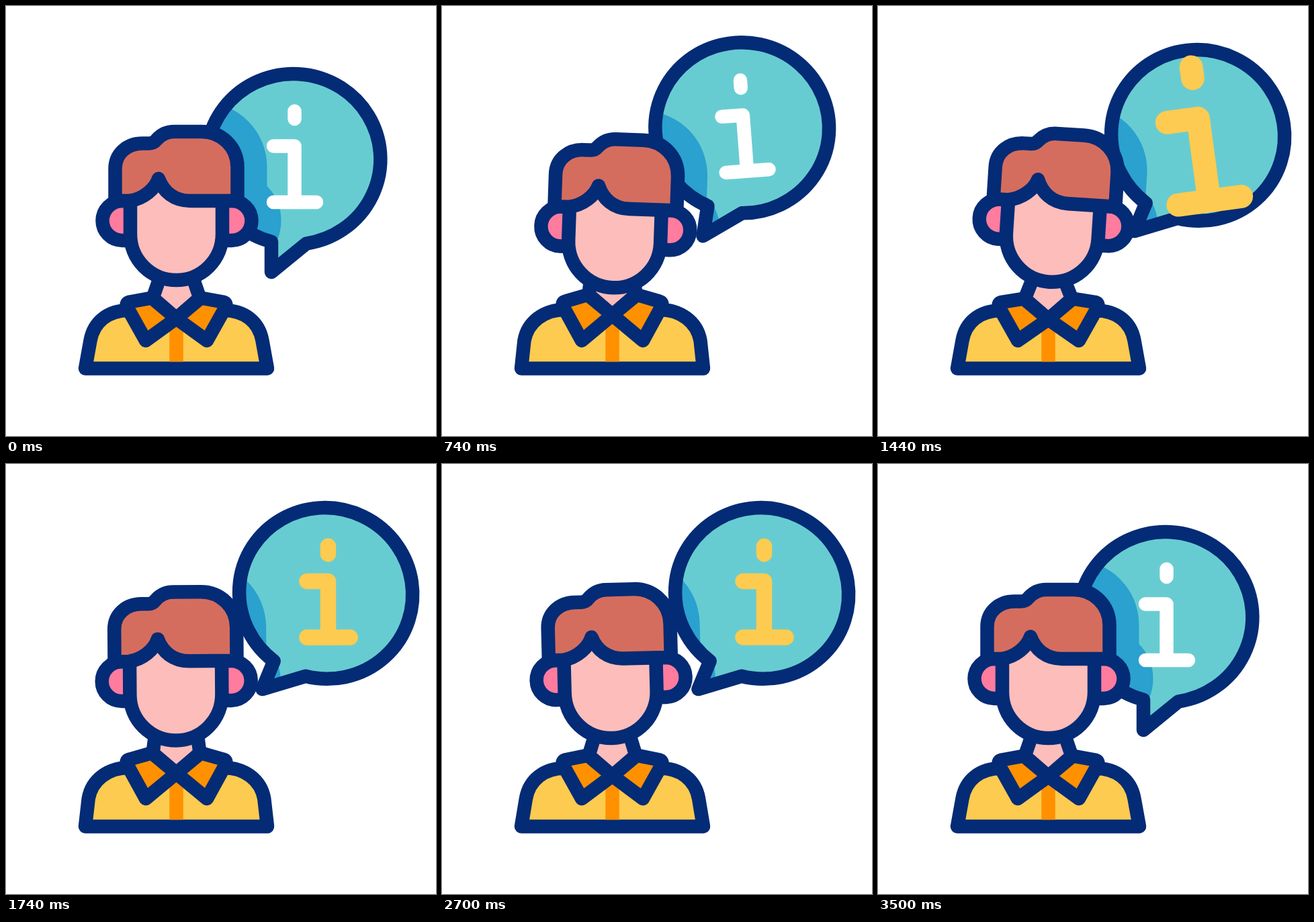
Animation of 640x640 px, one loop 3.52 s. Source, as an HTML page with a canvas:

```html
<!DOCTYPE html>
<html lang="en">
<head>
<meta charset="utf-8">
<title>Information</title>
<style>
  html, body { margin: 0; width: 100%; height: 100%; overflow: hidden; background: #fff; }
  canvas { display: block; }
</style>
</head>
<body>
<canvas id="stage" width="640" height="640"></canvas>
<script>
const ctx = document.getElementById('stage').getContext('2d');
const LOOP = 3520, LINE = 20.5;
const NAVY = '#042b75', SKIN = '#fdbdba', EAR = '#ff7c9f', HAIR = '#d56d5e',
      SHIRT = '#fdcb50', COLLAR = '#ff9100', TEAL = '#67ccd1', SHADE = '#2aa1ce';

const ears = new Path2D('M190 290H173a29.5 29.5 0 0 0 0 59H190M318 290H336a29.5 29.5 0 0 1 0 59H318');
const face = new Path2D('M185 290V339.5a68.5 68.5 0 0 0 137 0V290L227 257Z');
const hair = new Path2D('M162.5 290V242C162.5 220 180 204.5 203 204.5H213Q220 204.5 224 199C232 190 242 187 250 187' +
  'H291C321 187 344.5 210 344.5 240V290H274C250 290 234 276 227 257C222 272 205 287 184 290Z');
// Bubble and letter are centred on their own origins
const bubble = new Path2D('M-33 122.8A129.4 127 0 1 1 19 125.6L-33 168Z');
const letter = new Path2D('M0 -67.5V-56M-31.5 -15.5H0V68M-31.5 68H32.5');

// Smooth rise from 0 to 1 between two times
function ease(t, from, to) {
  const u = Math.min(1, Math.max(0, (t - from) / (to - from)));
  return u * u * (3 - 2 * u);
}
const hop = t => ease(t, 400, 700) - ease(t, 700, 1200);

function shape(path, fill, width = LINE, line = NAVY) {
  if (fill) { ctx.fillStyle = fill; ctx.fill(path); }
  ctx.lineWidth = width;
  ctx.strokeStyle = line;
  ctx.stroke(path);
}

function place(x, y, degrees, scale = 1) {
  ctx.setTransform(1, 0, 0, 1, x, y);
  ctx.rotate(degrees * Math.PI / 180);
  ctx.scale(scale, scale);
}

function placeHead(t) {
  const dip = 11.5 * hop(t) + 3.5 * (ease(t, 800, 1740) - ease(t, 2260, 2700));
  const tilt = 5.1 * ease(t, 400, 1200) - 9.8 * ease(t, 1200, 2200) + 4.7 * ease(t, 2200, 3000);
  place(254, 430 + dip, tilt);
  ctx.translate(-254, -430);
}

function drawBubble(t) {
  const go = ease(t, 400, 1200) - ease(t, 3080, 3500);
  const x = 428 + 48.2 * go, y = 228 - 35.5 * go - 33.5 * hop(t);
  ctx.save();
  place(x, y, 22.5 * go);
  ctx.fillStyle = TEAL;
  ctx.fill(bubble);
  ctx.clip(bubble);
  placeHead(t);
  for (const part of [ears, face, hair]) shape(part, SHADE, 88, SHADE);
  ctx.restore();
  place(x, y, 22.5 * go);
  shape(bubble);
  drawLetter(t, x + 1.5 + 1.8 * go, y - 4 + 1.5 * go);
}

function drawLetter(t, x, y) {
  const glow = ease(t, 1200, 1450) - ease(t, 3080, 3400);
  let size = 1, tilt = -4.4 * hop(t);
  // Three shrinking pulses, each with a wobble
  for (let i = 0; i < 3; i++) {
    const u = (t - 1200 - 530 * i) / 430;
    if (u < 0 || u > 1) continue;
    const swell = .5 / (i + 1) * Math.sin(Math.PI * u) ** 2;
    size += swell;
    tilt -= 22 * swell * Math.cos(4 * Math.PI * u);
  }
  const mix = (a, b) => Math.round(a + (b - a) * glow);
  place(x, y, tilt, size);
  shape(letter, null, LINE + 3 * glow, `rgb(${mix(255, 253)},${mix(255, 203)},${mix(255, 80)})`);
}

function drawBody(t) {
  const beat = .3 + 8.5 * Math.cos((t - 790) / 505 * 2 * Math.PI);
  const lift = beat * (ease(t, 200, 300) - ease(t, 2500, 3000));
  const side = 125.5 - .42 * Math.max(0, lift), shoulder = 453 - .15 * lift;
  const top = 434.5 - .65 * lift, mid = 465 - .7 * lift, neck = 238 - 1.9 * lift;
  const edge = 440.5 - .15 * lift;
  const flip = x => 507 - x;

  place(0, 0, 0);
  shape(new Path2D(`M118 539.5L${side} 498C${side + 5} 470 152 ${shoulder} 183 ${shoulder}L253.5 ${mid - 3}` +
    `L${flip(183)} ${shoulder}C${flip(152)} ${shoulder} ${flip(side + 5)} 470 ${flip(side)} 498L389 539.5Z`), SHIRT);
  ctx.fillStyle = COLLAR;
  ctx.fillRect(243.3, 465, 20.5, 64.4);
  shape(new Path2D(`M${neck} 378L218.5 ${top}L253.5 ${mid}L${flip(218.5)} ${top}L${flip(neck)} 378Z`), SKIN);
  for (const f of [x => x, flip]) {
    shape(new Path2D(`M${f(208)} 498L${f(180)} ${edge + 7.5}Q${f(178)} ${edge + 1.5} ${f(184)} ${edge}` +
      `L${f(217)} ${top}L253.5 ${mid}Z`), COLLAR);
  }
}

function draw(t) {
  place(0, 0, 0);
  ctx.fillStyle = '#fff';
  ctx.fillRect(0, 0, 640, 640);
  ctx.lineCap = ctx.lineJoin = 'round';
  drawBubble(t);
  drawBody(t);
  placeHead(t);
  shape(ears, EAR);
  shape(face, SKIN);
  shape(hair, HAIR);
}

const start = performance.now();
function tick() {
  draw((performance.now() - start) % LOOP);
  requestAnimationFrame(tick);
}
tick();
</script>
</body>
</html>
```
